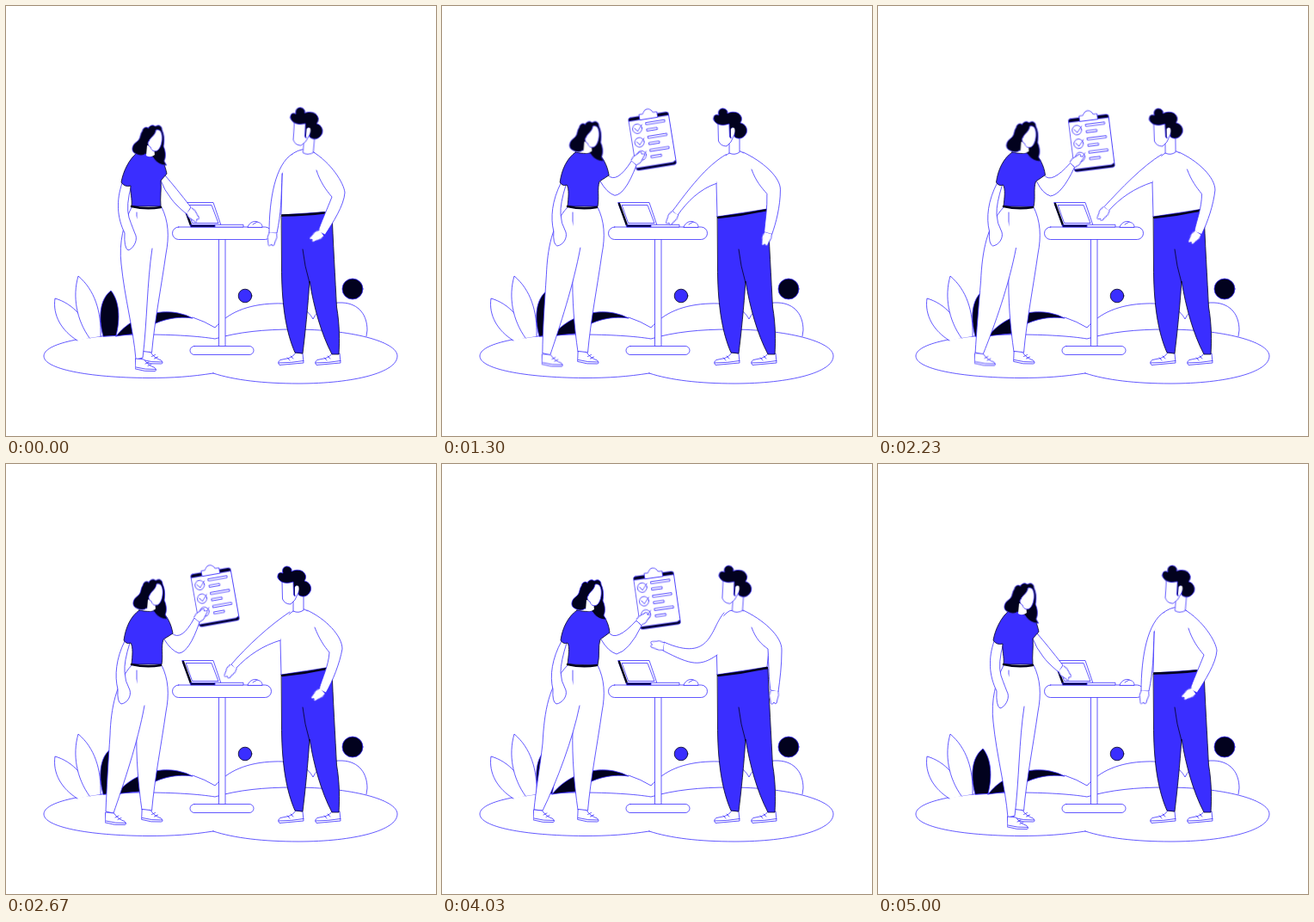
These frames come from a looping animation (500x500 px, 5030 ms). An HTML page without scripts:

```html
<!DOCTYPE html>
<html lang="en">
<head>
<meta charset="utf-8">
<title>Standing meeting</title>
<style>
html, body { margin: 0; width: 100%; height: 100%; overflow: hidden; background: #fff; }
svg { display: block; width: 100vw; height: 100vh; fill: #fff; stroke: #3a2eff; stroke-width: .8; stroke-linejoin: round; stroke-linecap: round; }
.blue { fill: #3a2eff; stroke: #02021e; }
.dark { fill: #02021e; }
.open { fill: none; }
.band { fill: none; stroke: #02021e; stroke-width: 2.4; }
.move { animation: 5.03s ease-in-out infinite; }

/* woman */
.w-head { animation-name: w-head; transform-origin: 168px 165px; }
@keyframes w-head {
  0%, 99.4%, 100% { transform: translate(0px, 4px) rotate(1deg); }
  15.3% { transform: translate(0px, 0px) rotate(0deg); }
  22.5%, 53.1%, 69% { transform: translate(1px, -.5px) rotate(0deg); }
  35.2%, 80.1% { transform: translate(4px, 0px) rotate(0deg); }
}
.w-shirt { animation-name: w-shirt; }
@keyframes w-shirt {
  0%, 99.4%, 100% { d: path("M152,171 C160,172 168,172 173,170 C181,175 185,185 187,195 L180,203 C181,213 179,222 180,233 L146,233 C147,225 144,215 145,209 Q138,211 134,205 C136,193 143,178 152,171Z"); }
  15.3% { d: path("M155,170 C163,172 172,172 178,169 C186,176 190,185 192,197 L182,203 C180,213 183,222 181,233 L146,233 C147,223 148,213 145,208 Q140,210 137,205 C139,190 145,177 155,170Z"); }
  22.5%, 53.1%, 69% { d: path("M155,170 C163,172 172,172 179,169 C187,176 192,185 194,197 L183,204 C180,213 183,222 181,233 L146,233 C147,223 148,213 145,208 Q140,210 137,205 C139,190 145,177 155,170Z"); }
  35.2%, 80.1% { d: path("M157,170 C165,172 174,172 181,169 C189,176 194,185 195,196 L184,204 C181,213 184,222 181,234 L146,233 C147,223 149,213 146,208 Q141,210 138,205 C140,190 147,177 157,170Z"); }
}
.w-rest { animation-name: w-rest; }
@keyframes w-rest {
  0%, 99.4%, 100% { d: path("M135,206 C128,226 129,246 138,264 Q137,281 142,284 C147,283 153,274 151,267 Q148,260 143,246 Q139,232 146,208"); }
  15.3% { d: path("M138,206 C130,226 128,246 132,262 Q134,279 140,281 C146,279 149,270 147,264 Q142,255 138,242 Q136,230 143,208"); }
  22.5%, 53.1%, 69% { d: path("M138,206 C128,226 126,246 130,262 Q129,277 134,279 C141,278 146,270 144,263 Q138,252 138,242 Q137,230 144,208"); }
  35.2%, 80.1% { d: path("M139,206 C128,226 125,246 129,262 Q128,277 133,279 C140,278 146,270 144,263 Q138,252 138,242 Q138,230 145,208"); }
}
.w-leg { animation-name: w-leg; }
@keyframes w-leg {
  0%, 99.4%, 100% { d: path("M146,234 C137,252 131,275 134,300 C138,340 148,375 151,411 L159,409 C164,370 164,320 170,282"); }
  15.3% { d: path("M146,234 C130,250 125,275 125,300 C124,340 125,375 125,405 L135,407 C140,375 155,325 163,281"); }
  22.5% { d: path("M146,234 C128,253 123,283 122,310 C120,345 118,375 118,404 L127,406 C137,374 153,325 161,281"); }
  35.2% { d: path("M146,234 C125,257 120,287 118,325 C115,352 112,380 110,402 L119,404 C135,370 152,322 160,282"); }
  53.1% { d: path("M146,234 C128,254 122,284 121,315 C119,345 117,378 116,404 L125,406 C136,374 153,325 161,281"); }
  69% { d: path("M146,234 C127,254 122,284 120,317 C118,347 116,379 114.500,404 L124,405 C136,373 153,325 161,281"); }
  80.1% { d: path("M146,234 C124,257 119,287 117,325 C114,352 109,380 107,402 L117,403 C134,368 152,320 160,281"); }
}
.w-foot { animation-name: w-foot; }
@keyframes w-foot {
  0%, 99.4%, 100% { transform: translate(151px, 410px); }
  15.3% { transform: translate(125px, 406px); }
  22.5% { transform: translate(118px, 405px); }
  35.2% { transform: translate(109.500px, 402px); }
  53.1% { transform: translate(116px, 405px); }
  69% { transform: translate(114.500px, 404.500px); }
  80.1% { transform: translate(107px, 402px); }
}
.w-arm { animation-name: w-arm; }
@keyframes w-arm {
  0%, 99.4%, 100% { d: path("M185,197 Q198,212 215,234 L210,242 Q197,231 192,224 Q184,214 180,203"); }
  15.3% { d: path("M190,196 Q200,212 222,187 L227,194 Q212,217 202,219 Q192,217 183,204"); }
  22.5%, 53.1% { d: path("M193,197 Q204,207 219,179 L225,184 Q213,219 201,220 Q192,217 184,204"); }
  35.2% { d: path("M194,197 Q199,208 229,186 L232,192 Q214,220 200,222 Q190,219 185,204"); }
  69% { d: path("M193,197 Q204,206 218,178 L224,183 Q212,218 201,219 Q192,217 184,204"); }
  80.1% { d: path("M194,196 Q202,208 226,182 L232,188 Q218,217 203,221 Q193,218 185,204"); }
}
.w-hand { animation-name: w-hand; }
@keyframes w-hand {
  0%, 99.4%, 100% { transform: translate(213px, 238px) rotate(48deg); }
  15.3% { transform: translate(225px, 190px) rotate(-45deg); }
  22.5%, 53.1% { transform: translate(222px, 181px) rotate(-50deg); }
  35.2% { transform: translate(231px, 188px) rotate(-40deg); }
  69% { transform: translate(221px, 180px) rotate(-50deg); }
  80.1% { transform: translate(229px, 184px) rotate(-42deg); }
}
.board { animation-name: board; }
@keyframes board {
  0%, 8%, 94%, 100% { transform: translate(226px, 225px) rotate(-16deg) scale(0); }
  15.3% { transform: translate(242px, 171px) rotate(-11.600deg) scale(.83); }
  22.5% { transform: translate(243px, 156px) rotate(-10deg) scale(1); }
  35.2% { transform: translate(254px, 164px) rotate(-4deg) scale(1); }
  53.1% { transform: translate(243px, 155px) rotate(-10deg) scale(1); }
  69% { transform: translate(242px, 154px) rotate(-11deg) scale(1); }
  80.1% { transform: translate(250px, 158.500px) rotate(-8deg) scale(1); }
  86% { transform: translate(247px, 172px) rotate(-10deg) scale(.9); }
}

/* man */
.m-head { animation-name: m-head; transform-origin: 339px 162px; }
@keyframes m-head {
  0%, 99.4%, 100% { transform: translate(12px, 0px) rotate(5deg); }
  15.3%, 22.5%, 53.1% { transform: translate(0px, 0px) rotate(0deg); }
  35.2% { transform: translate(0px, 0px) rotate(-2deg); }
  69% { transform: translate(.5px, 0px) rotate(.5deg); }
  80.1% { transform: translate(4px, 0px) rotate(4deg); }
}
.m-torso { animation-name: m-torso; }
@keyframes m-torso {
  0%, 99.4%, 100% { d: path("M344,167 C330,170 322,182 321,198 L320,243 L378,239 L380,218 C377,198 370,180 356,168Z"); }
  15.3%, 22.5%, 35.2%, 53.1%, 69%, 80.1% { d: path("M334,171 C322,178 319,192 319,206 L320,245 L378,236 L380,216 C375,195 366,178 347,169Z"); }
}
.m-hem { animation-name: m-hem; }
@keyframes m-hem {
  0%, 99.4%, 100% { d: path("M321,243.500 Q350,243 370,240.500"); }
  15.3%, 80.1% { d: path("M321,246 Q350,243 378,237"); }
}
.m-arm { animation-name: m-arm; }
@keyframes m-arm {
  0%, 99.4%, 100% { d: path("M333,172 C313,184 306,225 306,264 L315,264 C320,240 320,225 321,195"); }
  15.3% { d: path("M331,172 C306,187 288,215 273,244 L280,249 C290,232 301,214 319,208"); }
  35.2% { d: path("M330,173 C308,185 285,213 264,234 L269,239 C280,225 298,212 319,205"); }
  53.1% { d: path("M330,172 C306,188 280,212 262,233 L267,238 C282,222 299,211 319,205"); }
  69% { d: path("M328,174 C313,185 306,218 263,222 L265,231 C300,229 302,229 319,210"); }
  80.1% { d: path("M328,173 C312,190 314,232 258,207 L257,217 C290,234 300,236 320,222"); }
}
.m-hand { animation-name: m-hand; }
@keyframes m-hand {
  0%, 99.4%, 100% { transform: translate(310.500px, 264px) rotate(98deg); }
  15.3% { transform: translate(276.500px, 246.500px) rotate(120deg); }
  35.2% { transform: translate(266.500px, 236.500px) rotate(122deg); }
  53.1% { transform: translate(264.500px, 235.500px) rotate(122deg); }
  69% { transform: translate(264px, 226.500px) rotate(160deg); }
  80.1% { transform: translate(257.500px, 212px) rotate(188deg); }
}
.m-rest { animation-name: m-rest; }
@keyframes m-rest {
  0%, 99.4%, 100% { d: path("M356,169 C378,182 393,206 394,217 C393,232 380,252 371,266 L363,262 C367,250 371,242 379,222 C372,214 365,204 361,191"); }
  15.3% { d: path("M350,170 C372,180 395,200 394,215 C395,235 390,255 387,266 L378,264 C378,250 379,235 379,219 C372,212 365,204 360,190"); }
  35.2% { d: path("M350,170 C372,180 393,198 393,213 C392,232 387,250 381,265 L372,262 C374,248 378,235 377,218 C371,210 365,204 360,190"); }
  53.1% { d: path("M350,170 C372,180 391,200 391,215 C388,232 380,252 372,266 L364,262 C368,248 375,235 376,219 C370,212 364,203 359,190"); }
  69% { d: path("M350,170 C372,180 394,198 394,213 C393,232 388,250 383,265 L374,263 C376,248 379,235 378,218 C371,210 365,204 360,190"); }
  80.1% { d: path("M350,170 C372,180 396,200 395,217 C395,235 393,250 391,265 L382,263 C380,250 380,235 379,215 C372,210 365,204 360,190"); }
}
.m-palm { animation-name: m-palm; }
@keyframes m-palm {
  0%, 99.4%, 100% { transform: translate(367px, 264px) rotate(145deg); }
  15.3% { transform: translate(382.500px, 265px) rotate(98deg); }
  35.2% { transform: translate(376.500px, 263.500px) rotate(112deg); }
  53.1% { transform: translate(368px, 264px) rotate(138deg); }
  69% { transform: translate(378.500px, 264px) rotate(108deg); }
  80.1% { transform: translate(386.500px, 264px) rotate(92deg); }
}
</style>
</head>
<body>
<svg viewBox="0 0 500 500">
  <defs>
    <path id="hand" d="M0,-4.500 Q5,-6 9,-4 L14,-3 Q16,-1 13,0 L15,1.500 Q16,4 12,4 Q5,7 0,4.500"/>
    <g id="shoe">
      <path d="M0,0 L9.500,1 Q14,8 22,10.500 Q25,14 22,14.500 Q10,15.500 -.5,12Z"/>
      <path class="open" d="M0,10 Q11,13 23,12.500 M11,6 l4,-2 M14,8.500 l4,-2"/>
    </g>
    <g id="boot">
      <path d="M337,403 L345,404 L346,415 L318,417.500 Q315,414 319,411.500 L329,409.500 Q334,408 337,403Z"/>
      <path class="open" d="M317,415 Q332,415 346,412.500 M327,409 l3,3 M331,407 l3,3"/>
    </g>
    <g id="item">
      <circle cx="-15" cy="-17" r="5.500"/>
      <path class="open" d="M-18,-18 l3,4 l6,-7"/>
      <path d="M-4,-22.500 h22 v2.500 h-22Z M-4,-15 h12 v2.500 h-12Z"/>
    </g>
  </defs>

  <!-- ground and plants -->
  <path class="open" d="M241,427 C215,431 195,432.500 165,432.500 C95,432 44,422 44,407 C44,393 90,382 160,382 C195,382 225,384 243,387 C270,379 300,376 335,376 C400,376 455,390 455,407 C455,426 405,439 340,439 C300,439 265,435 241,427Z"/>
  <path class="open" d="M217,362 Q232,367 243,374 C258,357 280,347 312,346 C335,345 350,351 357,364 C363,351 378,344 391,345 C411,346 420,360 420,377 L419,384"/>
  <path d="M83,389 C65,378 54,360 57,340 C78,346 94,364 98,386"/>
  <path d="M97,386 C82,365 77,338 84,314 C103,330 111,355 110,384"/>
  <path class="dark" d="M113,384 C107,362 109,341 122,331 C132,343 133,364 128,383Z"/>
  <path class="dark" d="M128,384 C145,362 175,352 200,357 Q210,359 217,363 C195,360 172,366 156,381 Q140,382 128,384Z"/>
  <circle class="blue" cx="278" cy="337" r="7.800"/>
  <circle class="dark" cx="403" cy="329" r="12"/>

  <!-- table -->
  <path d="M247.500,271 V396 H255 V271"/>
  <rect x="193.500" y="257" width="115" height="14.500" rx="7.250"/>
  <rect x="214" y="395.500" width="74" height="10" rx="5"/>
  <path d="M205,228.500 H241 L250,255 H215Z"/>
  <path class="open" d="M209.500,231.500 H239 L247,252.500 H217Z"/>
  <path class="band" d="M206,230 L215,255"/>
  <path d="M243,254.300 H276 V257 H243Z"/>
  <path class="dark" d="M215,254.600 H243 V257 H215Z"/>
  <path d="M281,257 C283,251 290,249 293,251.500 C297,252 298,255 298,257Z M287,254 L292,251"/>

  <!-- woman -->
  <path d="M181,234 C189,250 190,268 186,288 C180,330 173,365 169.500,403 L158,402 C154,375 151,340 152,310 L152,240"/>
  <use href="#shoe" x="158.500" y="401.500"/>
  <path class="move w-leg"/>
  <g class="move w-foot"><use href="#shoe"/></g>
  <path class="move w-rest"/>
  <g class="move board">
    <rect class="dark" x="-23.500" y="-31" width="47" height="62" rx="2.500"/>
    <path d="M-23.500,-27 H23.500 V26 L20,28 H-23.500Z"/>
    <path d="M-10.500,-27 V-33 H-6 Q-5,-35 -4,-36 Q0,-40 4,-36 Q5,-35 6,-33 H10.500 V-27Z"/>
    <use href="#item"/><use href="#item" y="16"/><use href="#item" y="31.500"/>
  </g>
  <path class="move w-arm"/>
  <g class="move w-hand"><use href="#hand"/></g>
  <path class="blue move w-shirt"/>
  <path class="band" d="M146,233 Q163,237 180,234"/>
  <g class="move w-head">
    <path class="dark" d="M165,138 C167,134 171,134 173,136 C178,133 181,136 181,140 C184,146 184,153 183,159 C186,165 186,172 184,176 L187,181 C180,181 175,178 171,172 L162,168 C158,172 152,169 149,167 C145,164 147,157 152,154 C157,150 155,146 158,142 C159,137 163,136 165,138Z"/>
    <path stroke="none" d="M164,158 L163,170 Q168,173 173,169 L172,160Z"/>
    <path d="M166,153 C168,148 173,147 174,140 C178,139 180,141 181,146 C182,153 180,161 176,164 C172,166 169,164 168,160 C165,159 164,155 166,153Z"/>
  </g>

  <!-- man -->
  <use href="#boot"/><use href="#boot" x="43"/>
  <path class="blue" d="M320.500,244 L379,238 C380,270 383,320 384.500,350 C388,370 388,390 387,405 L379,405 C366,380 358,350 353,320 C351,350 348,380 345,404 L336,403 C326,380 321,350 320.500,310Z"/>
  <path class="open" stroke="#02021e" d="M345,283 Q347,302 353,322"/>
  <path class="move m-torso"/>
  <path class="band move m-hem" stroke-width="2"/>
  <path class="move m-arm"/>
  <g class="move m-hand"><use href="#hand"/></g>
  <path class="move m-rest"/>
  <g class="move m-palm"><use href="#hand"/></g>
  <g class="move m-head">
    <path d="M334,150 V171 Q340,174 346,170 V150Z"/>
    <path d="M321,136 L321.500,157 Q324,163 331,163 L336,158 L342,145 L336,134Z"/>
    <path class="dark" d="M316,132 C315,127 319,125 322,127 C320,121 325,117 330,120 Q333,122 332,125 C337,122 345,123 347,127 C350,131 348,134 347,136 C353,137 356,143 354,148 C351,154 345,156 340,152 L340,144 Q337,139 336,144 L336,154 L334.500,152 L334,137 C326,140 318,138 316,132Z"/>
    <path stroke="none" d="M336,143 Q341,139 340.500,146 Q340,151 336,152Z"/>
  </g>
</svg>
</body>
</html>
```
